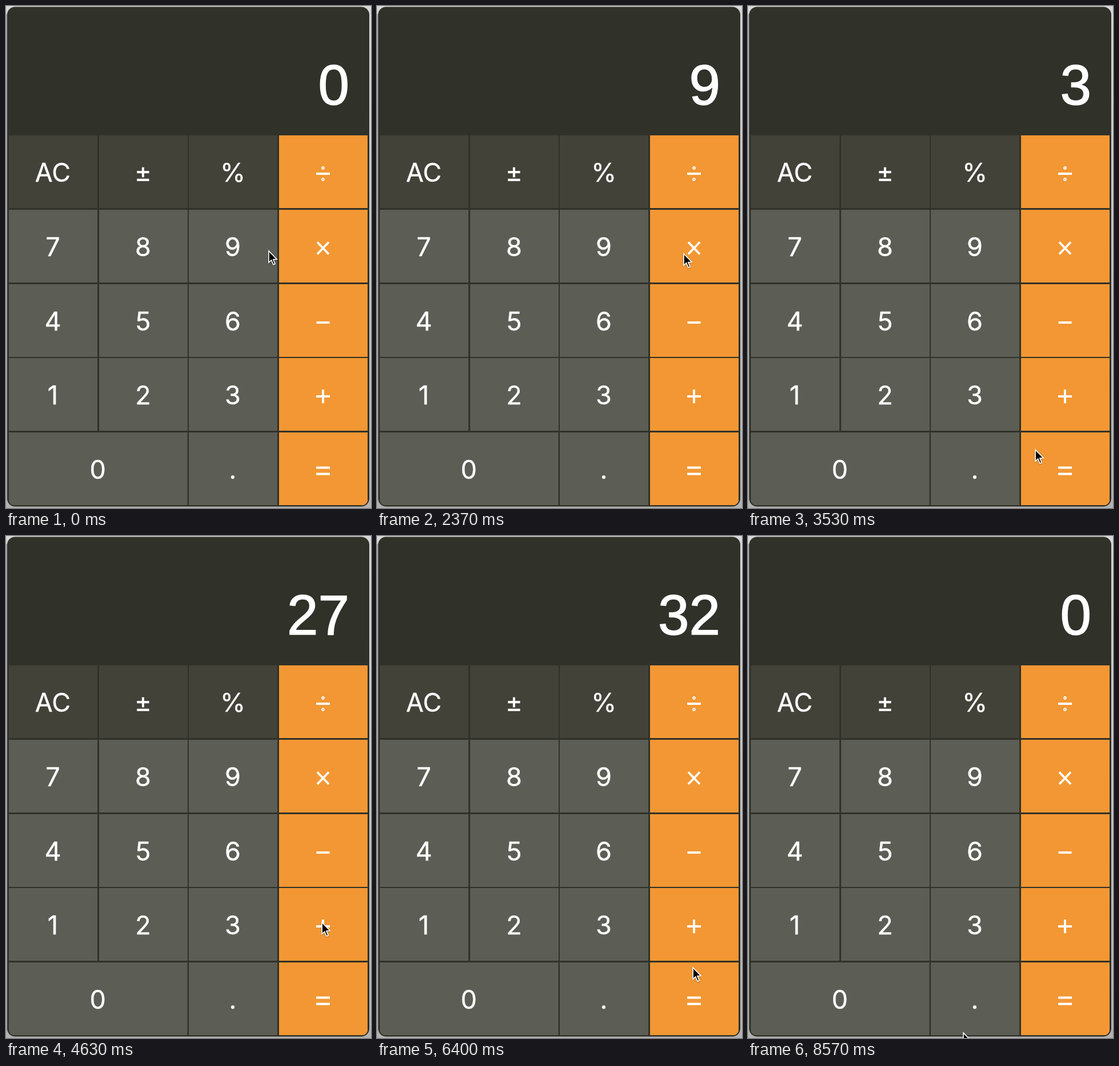
An HTML page for the animation above (8760 ms loop, 639 by 877 pixels).

```html
<!DOCTYPE html>
<html lang="en">
<head>
<meta charset="utf-8">
<title>Calculator</title>
<style>
  html, body { margin: 0; width: 100%; height: 100%; overflow: hidden; background: #c4c4c4; }
  svg { display: block; width: 639px; height: 877px; }
  text { fill: #fff; stroke: #fff; stroke-width: .4; font: 45px Inter, sans-serif; text-anchor: middle; }
  #display { font: 98px "Liberation Sans", Arial, sans-serif; stroke-width: 1.5; text-anchor: end; }
  .sign { fill: none; stroke: #fff; stroke-width: 3.8; }
</style>
</head>
<body>
<svg viewBox="0 0 639 877">
  <defs>
    <linearGradient id="desk" x2="0" y2="1">
      <stop stop-color="#d8d8d8"/><stop offset="1" stop-color="#b2b2b2"/>
    </linearGradient>
    <clipPath id="inner"><rect x="4.5" y="4" width="629" height="868.5" rx="11"/></clipPath>
    <filter id="shadow" x="-50%" y="-50%" width="200%" height="200%">
      <feDropShadow dx="0" dy="1" stdDeviation="1" flood-opacity=".35"/>
    </filter>
  </defs>
  <rect width="639" height="877" fill="url(#desk)"/>
  <rect y="14" width="3" height="850" fill="#a8a8a8"/>
  <rect x="2" y="1.5" width="634" height="873" rx="14" fill="#303129"/>
  <g id="keys" clip-path="url(#inner)"></g>
  <text id="display" x="601" y="172"></text>
  <path id="cursor" d="M0 0V20L4.6 15.8 8 23.8 11 22.5 7.8 14.7 14 14.3Z"
        stroke="#fff" stroke-width="1.6" filter="url(#shadow)"/>
</svg>
<script>
const LOOP = 8760;
const COL = 157.6, ROW = 129.75, KEY_W = 155, KEY_H = 127;
const HOLD = 160, LAG = 15;
const $ = id => document.getElementById(id);

// Resting and pressed colours
const FUNCTION = ['#424239', '#5c5d55'];
const DIGIT = ['#5c5d55', '#7e7f78'];
const OPERATOR = ['#f29733', '#c77d2d'];

const dot = y => `M-1 ${y}a1 1 0 1 0 2 0a1 1 0 1 0-2 0`;
const SIGNS = {
  '÷': 'M-12 0H12' + dot(-10) + dot(10),
  '×': 'M-10-10.5L10 10.5M10-10.5L-10 10.5',
  '−': 'M-11.5 0H11.5',
  '+': 'M-12 0H12M0-12V12',
  '=': 'M-12-5.5H12M-12 5.5H12'
};

const ROWS = ['AC ± % ÷', '7 8 9 ×', '4 5 6 −', '1 2 3 +', '0  . ='];
const keys = {};

function add(tag, attrs, text = '') {
  const node = document.createElementNS('http://www.w3.org/2000/svg', tag);
  for (const name in attrs) node.setAttribute(name, attrs[name]);
  node.textContent = text;
  return $('keys').appendChild(node);
}

ROWS.forEach((labels, row) => labels.split(' ').forEach((label, col) => {
  if (!label) return;
  const x = Math.round(5 + col * COL), y = Math.round(226 + row * ROW);
  const width = label === '0' ? KEY_W + COL : KEY_W;
  const colors = col === 3 ? OPERATOR : row === 0 ? FUNCTION : DIGIT;
  const rect = add('rect', { x, y, width, height: KEY_H });
  const cx = x + width / 2 - 0.5;
  if (SIGNS[label]) {
    add('path', { class: 'sign', d: SIGNS[label], transform: `translate(${cx} ${y + 67})` });
  } else {
    add('text', { x: cx, y: y + 81 }, label);
  }
  keys[label] = { rect, colors };
}));

// Where the pointer stops, and the key it presses there, if any
const stop = (key, down, x, y) => ({ key, down, up: down + HOLD, x, y });
const STOPS = [
  stop('', -HOLD, 460, 428),
  stop('', 180, 501, 428),
  stop('9', 1900, 409, 430),
  stop('×', 2400, 537, 433),
  stop('3', 3070, 405, 698),
  stop('=', 3860, 558, 794),
  stop('+', 4860, 553, 674),
  stop('5', 5562, 294, 565),
  stop('=', 6220, 558, 794),
  stop('', 6750, 184, 417),
  stop('AC', 7300, 95, 305),
  stop('', 8170, 95, 305),
  stop('', 8630, 377, 868)
];

const APPLY = { '+': (a, b) => a + b, '×': (a, b) => a * b };

// Run the pressed keys through a small calculator
function readout(t) {
  let shown = '0', stored = 0, operator;
  for (const { key, up } of STOPS) {
    if (!key || up + LAG > t) continue;
    if (APPLY[key]) {
      stored = +shown;
      operator = key;
      shown = '0';
    } else if (key === '=') {
      shown = String(APPLY[operator](stored, +shown));
    } else {
      shown = key === 'AC' ? '0' : String(+(shown + key));
    }
  }
  return shown;
}

// The pointer leaves on release and settles before the next press
function pointer(t) {
  const from = STOPS.findLast(s => s.up <= t);
  const to = STOPS[STOPS.indexOf(from) + 1] || from;
  const travel = Math.min(750, 0.8 * (to.down - from.up));
  const p = to === from ? 1 : Math.min(1, (t - from.up) / travel);
  const easeX = p * p * (3 - 2 * p), easeY = Math.sin(p * Math.PI / 2);
  return [from.x + (to.x - from.x) * easeX, from.y + (to.y - from.y) * easeY];
}

function draw(now) {
  const t = now % LOOP;
  const pressed = STOPS.find(s => t >= s.down && t < s.up);
  for (const label in keys) {
    const { rect, colors } = keys[label];
    rect.setAttribute('fill', colors[pressed && pressed.key === label ? 1 : 0]);
  }
  $('display').textContent = readout(t);
  $('cursor').setAttribute('transform', `translate(${pointer(t)})`);
}

let start;
function tick(now) {
  start ??= now;
  draw(now - start);
  requestAnimationFrame(tick);
}
draw(0);
requestAnimationFrame(tick);
</script>
</body>
</html>
```
